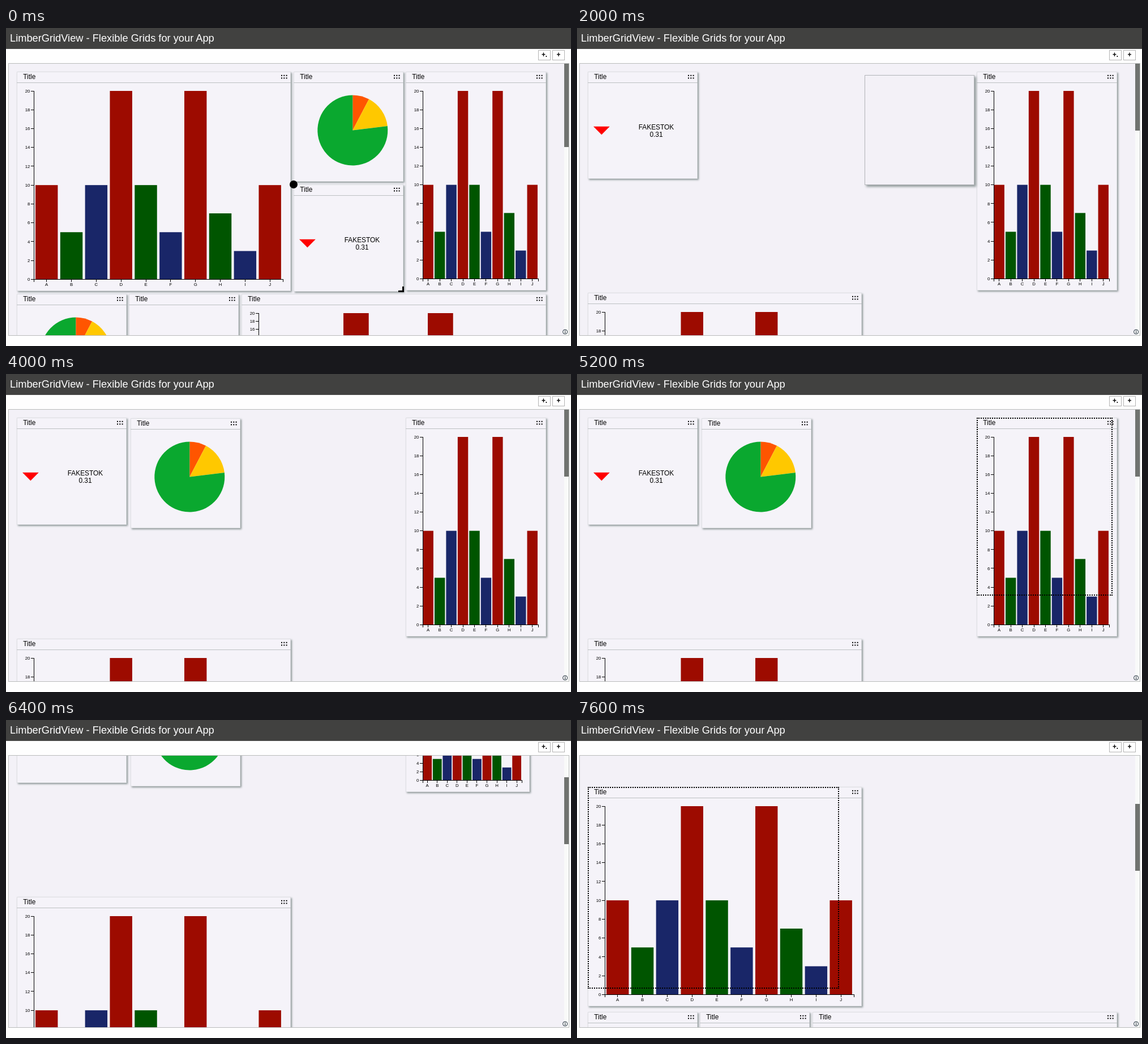
These frames come from a looping animation (998x561 px, 8 s). An HTML page:

```html
<!DOCTYPE html>
<html lang="en">
<head>
<meta charset="utf-8">
<title>LimberGridView</title>
<style>
html, body { margin: 0; width: 100%; height: 100%; overflow: hidden; background: #fefefe; }
body { position: relative; font: 11.9px "Liberation Sans", Arial, sans-serif; color: #000; }
div, svg { position: absolute; box-sizing: border-box; }
svg { left: 0; top: 0; overflow: visible; }
header { height: 36px; border-bottom: 1px solid #4c4c4b; background: #414140; color: #fff;
  font-size: 18.25px; line-height: 36px; padding-left: 7px; white-space: nowrap; }
.button { top: 39px; width: 22px; height: 18px; border: 1px solid #b4b4b4; background: #fff;
  font-weight: bold; line-height: 15px; text-align: center; }
#frame { left: 4px; top: 62px; width: 991px; height: 481px; border: 1px solid #b9bbbb; background: #f3f1f7; }
#track { left: 986px; top: 63px; width: 8px; height: 479px; background: #f9faf9; }
#thumb { width: 8px; background: #707370; }
#view { left: 0; top: 0; width: 998px; height: 561px; clip-path: inset(63px 12px 19px 5px); }
.panel { background: #f5f3f9; box-shadow: inset 0 0 0 1px #dedfe3, 2px 2px 3px #8f9999; }
.ghost { border: 1px solid #b4b6ba; box-shadow: 3px 3px 4px #8f9999; }
.ok { border: 2px solid #078a14; }
.dotted { border: 2px dotted #000; }
.dot { border-radius: 50%; background: #000; }
.start { border: solid #000; border-width: 2.5px 0 0 2.5px; }
.end { border: solid #000; border-width: 0 3px 3px 0; }
.tick { font-size: 7.8px; }
.axis { stroke: #000; fill: none; shape-rendering: crispEdges; }
</style>
</head>
<body>
<header>LimberGridView - Flexible Grids for your App</header>
<div class="button" style="left:940px">+.</div>
<div class="button" style="left:965px">+</div>
<div id="frame"></div>
<div id="track"><div id="thumb"></div></div>
<div id="view"><div id="grid"></div></div>
<svg width="998" height="561">
  <circle cx="987.6" cy="536" r="4" fill="#fff" stroke="#1c2b38"/>
  <path d="M987.6 533.3v1.2M987.6 535.3v3.3" stroke="#1c2b38" stroke-width="1.3"/>
</svg>
<script>
const STEP = 400, COUNT = 20;
const VALUES = [10, 5, 10, 20, 10, 5, 20, 7, 3, 10];
const BAR_COLORS = ['#9d0b00', '#005500', '#192668'];
const grid = document.getElementById('grid');
const thumb = document.getElementById('thumb');

const box = (cls, x, y, w, h, inner = '') =>
  `<div class="${cls}" style="left:${x}px;top:${y}px;width:${w}px;height:${h}px">${inner}</div>`;

const text = (x, y, s, anchor = 'start', cls = '') =>
  `<text x="${x}" y="${y}" text-anchor="${anchor}" class="${cls}">${s}</text>`;

function panel(x, y, w, h, content = '') {
  let handle = '';
  for (const dx of [17, 12.7, 8.4])
    for (const dy of [5.8, 10.4])
      handle += `<rect x="${w - dx}" y="${dy}" width="2" height="2"/>`;
  return box('panel', x, y, w, h, `<svg width="${w}" height="${h}">
    <rect y="19" width="${w}" height="1" fill="#bcc0c2"/>${text(11.3, 13, 'Title')}${handle}${content}</svg>`);
}

function barPanel(x, y, w, h, offset, step) {
  const left = 30, right = w - 14, top = 34, base = h - 20.7;
  const scale = v => base - v * (base - top) / 20;
  let bars = '', labels = '', path = `M${left - 5} ${top}H${left}V${base}H${right}v5M${left} ${base}v5`;
  VALUES.forEach((v, i) => {
    const bx = left + offset + i * step, mid = bx + step * 0.45;
    bars += `<rect x="${bx}" y="${scale(v)}" width="${step * 0.9}" height="${base - scale(v)}" fill="${BAR_COLORS[i % 3]}"/>`;
    path += `M${mid} ${base}v5`;
    labels += text(mid, base + 12, 'ABCDEFGHIJ'[i], 'middle', 'tick');
  });
  for (let v = 0; v <= 20; v += 2) {
    path += `M${left - 5} ${scale(v)}h5`;
    labels += text(left - 6.6, scale(v) + 2.8, v, 'end', 'tick');
  }
  return panel(x, y, w, h, `${bars}<path class="axis" d="${path}"/>${labels}`);
}

function piePanel(x, y) {
  const cx = 104.3, cy = 103.5, r = 62;
  const point = part => {
    const a = part / 13 * 2 * Math.PI;
    return `${cx + r * Math.sin(a)} ${cy - r * Math.cos(a)}`;
  };
  const slice = (from, to, color) => `<path fill="${color}"
    d="M${cx} ${cy}L${point(from)}A${r} ${r} 0 ${+(to - from > 6.5)} 1 ${point(to)}Z"/>`;
  return panel(x, y, 194, 194,
    slice(0, 1, '#ff5500') + slice(1, 3, '#ffc800') + slice(3, 13, '#0aa82f'));
}

const stockPanel = (x, y) => panel(x, y, 194, 189,
  `<path d="M10 96.7h28.8l-14.4 14.5z" fill="#f00"/>
   ${text(121, 101.5, 'FAKESTOK', 'middle')}${text(121, 114.7, '0.31', 'middle')}`);

const bigPanel = y => barPanel(19, y, 484, 387, 3, 43.83);

const bottomRow = y => piePanel(19, y) + panel(217, y, 194, 194) + barPanel(416, y, 538, 197, 1, 49.67);

// Marks on a hovered panel: a move dot and a resize corner.
const hover = (x, y, w, h) =>
  box('dot', x - 7, y - 7, 14, 14) + box('end', x + w - 9, y + h - 8, 10, 10);

const ghost = (x, y, h, cls = '') => box('ghost ' + cls, x, y, 194, h);
const target = (x, y) => box('start', x, y, 11, 11);
const dotted = (x, y, w, h) => box('dotted', x, y, w, h);

function scene(i) {
  const dropped = i >= 3;
  let out = '';

  // Stock panel moves to the front of the grid.
  if (i < 2) out += bigPanel(77);
  if (dropped) out += stockPanel(19, 77) + bigPanel(467);
  if (i === 0) out += stockPanel(508, 275.5);

  // Pie panel moves next to it.
  if (i < 5) out += piePanel(508, 77);
  if (i >= 10) out += piePanel(220, 78);

  // Tall chart shrinks.
  if (i < 14) out += barPanel(706, 77, 248, 386, 0.5, 20.45);
  if (i >= 15) out += barPanel(706, 77, 219, 205, 0.3, 17.55);

  out += bottomRow(dropped ? 864 : 469);

  const overlays = {
    0: () => hover(508, 276, 194, 188),
    1: () => ghost(512, 281, 188),
    2: () => ghost(331, 235.5, 188, 'ok') + target(19, 77),
    4: () => hover(508, 77.5, 194, 194),
    5: () => ghost(508, 83, 194),
    6: () => ghost(421, 79, 194),
    7: () => ghost(302, 82, 194),
    8: () => ghost(218, 77, 194),
    9: () => ghost(218, 77, 194, 'ok') + target(220, 78),
    11: () => dotted(706, 77, 248, 386),
    12: () => dotted(706, 77, 244 - 5, 371),
    13: () => dotted(706, 77, 240, 314),
    15: () => hover(706, 78, 219, 204),
    18: () => dotted(19, 467, 484, 387),
    19: () => dotted(19, 467, 444, 356)
  };
  return out + (overlays[i] ? overlays[i]() : '');
}

let shown = -1;
function draw(now) {
  const i = Math.floor(now / STEP) % COUNT;
  if (i !== shown) {
    shown = i;
    const scroll = i < 16 ? 0 : i < 17 ? 155 : 349;
    grid.innerHTML = scene(i);
    grid.style.top = -scroll + 'px';
    thumb.style.top = scroll * 0.2436 + 'px';
    thumb.style.height = (i < 3 ? 147 : 118) + 'px';
  }
  requestAnimationFrame(draw);
}
draw(0);
</script>
</body>
</html>
```
